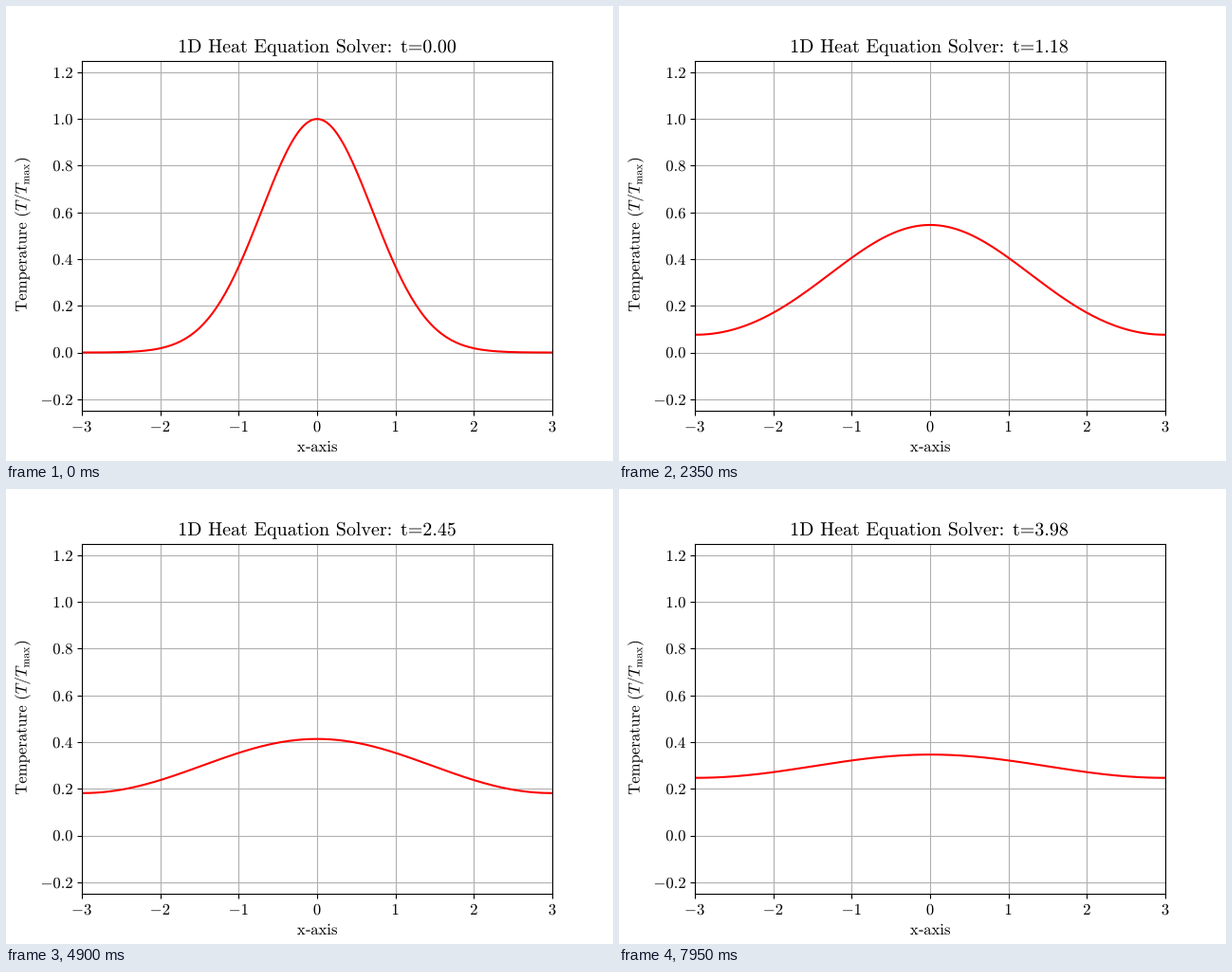
A matplotlib script for the animation above (8000 ms loop, 640 by 480 pixels).

```python
import matplotlib.pyplot as plt
import numpy as np
from matplotlib.animation import FuncAnimation
from matplotlib.patches import PathPatch
from matplotlib.path import Path
from matplotlib.textpath import TextPath
from matplotlib.transforms import Affine2D

W, H = 640, 480
FRAMES, INTERVAL = 160, 50
DT = 0.025            # solver time per frame
ALPHA = 0.5           # diffusivity
WALL = 2.985          # insulated wall, half a cell inside the last node
SMALL, LARGE = 12 * 100 / 72, 14.4 * 100 / 72

plt.rcParams["mathtext.fontset"] = "cm"
plt.rcParams["font.family"] = "Liberation Serif"

fig, ax = plt.subplots(figsize=(W / 100, H / 100), dpi=100)
pixels = Affine2D().scale(1 / W, 1 / H) + fig.transFigure


def outline(s, size):
    path = TextPath((0, 0), s, size=size)
    return Path(path.vertices, path.codes)


def span(path):
    """Left and right edge of the ink."""
    xs = path.vertices[path.codes != Path.CLOSEPOLY, 0]
    return xs.min(), xs.max()


def label(s, x, y, align=0.5, angle=0):
    """Outline of s with its baseline at (x, y), y counted from the top."""
    path = outline(s, SMALL)
    left, right = span(path)
    move = Affine2D().translate(-left - align * (right - left), 0)
    return path.transformed(move.rotate_deg(angle).translate(x, H - y))


def add_ink(path):
    return fig.add_artist(PathPatch(path, facecolor="black", linewidth=0,
                                    transform=pixels))


def temperature(x, t):
    """Spreading Gaussian, mirrored at both walls."""
    s = 1 + 4 * ALPHA * t
    return sum(np.exp(-(x - 2 * WALL * k) ** 2 / s)
               for k in range(-2, 3)) / np.sqrt(s)


# Curve and axes
x = np.linspace(-3, 3, 201)
line, = ax.plot(x, np.exp(-x ** 2), color="red", linewidth=1.5)
ax.set_xlim(-3, 3)
ax.set_ylim(-0.25, 1.25)
ax.set_xticks(range(-3, 4))
ax.set_yticks(np.arange(-1, 7) * 0.2)
ax.tick_params(labelbottom=False, labelleft=False)
ax.grid(True)

# Fixed labels
labels = [label(f"${v}$", 328 + v * 248 / 3, 449) for v in range(-3, 4)]
labels += [label(f"${k * 0.2:.1f}$", 69.8,
                 round(365.6 - k * 49.28 + 5.8), align=1)
           for k in range(-1, 7)]
labels.append(label(r"$\mathrm{x}$-$\mathrm{axis}$", 328, 470))
labels.append(label(
    r"$\mathrm{Temperature}\hspace{0.38}(T/T_{\mathrm{max}})$",
    21.5, 241.5, angle=90))
add_ink(Path.make_compound_path(*labels))

# Title: fixed words, then a counter set from single glyphs
words = r"\hspace{0.38}".join(["1D", "Heat", "Equation", "Solver"])
colon = r"\hspace{-0.2}:\hspace{0.3}"
prefix = outline(rf"$\mathrm{{{words}{colon}t}}\hspace{{-0.2}}=$"
                 .replace(r"}\hspace{-0.2}=", r"\hspace{-0.2}=}"), LARGE)
glyphs = {c: outline(f"${c}$", LARGE) for c in "0123456789"}
glyphs["."] = outline(r"$\mathrm{.}$", LARGE)
advance = {c: (0.278 if c == "." else 0.5) * LARGE for c in glyphs}
left, right = span(prefix)
pen = right + 0.056 * LARGE
title_mid = (left + pen + 1.738 * LARGE) / 2


def title_path(i):
    parts, at = [prefix], pen
    for c in f"{i * DT:.2f}":
        parts.append(glyphs[c].transformed(Affine2D().translate(at, 0)))
        at += advance[c]
    place = Affine2D().translate(328.5 - i % 2 - title_mid, H - 49)
    return Path.make_compound_path(*parts).transformed(place)


title = add_ink(title_path(0))


def update(i):
    line.set_ydata(temperature(x, i * DT))
    title.set_path(title_path(i))
    return line, title


anim = FuncAnimation(fig, update, frames=FRAMES, interval=INTERVAL,
                     init_func=lambda: update(0), repeat=True, repeat_delay=0)
plt.show()
```
